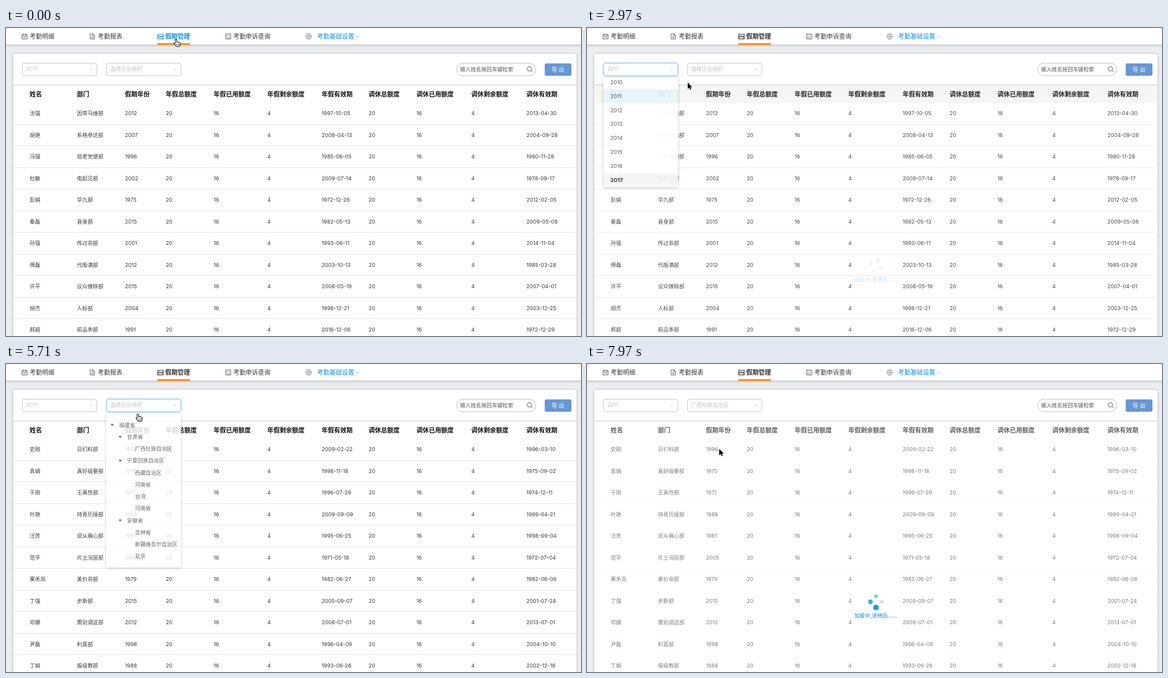
Animation of 1022x548 px, one loop 8000 ms. Source, as an HTML page with a canvas:

```html
<!DOCTYPE html>
<html lang="zh-CN">
<head>
<meta charset="utf-8">
<title>假期管理</title>
<style>
html, body { margin: 0; width: 100%; height: 100%; overflow: hidden; background: #ebedf0; }
canvas { display: block; width: 1022px; height: 548px; }
</style>
</head>
<body>
<canvas id="stage"></canvas>
<script>
const W = 1022, H = 548, LOOP = 8000;
const BLUE = '#0b8ff0', INK = '#3a3a3a', PALE = '#bfbfbf', HOVER = '#e7f5fe';
const FAMILY = 'Inter, "Noto Sans CJK SC", "Noto Sans CJK", sans-serif';
const dpr = window.devicePixelRatio || 1;

const makeContext = canvas => {
  canvas.width = W * dpr;
  canvas.height = H * dpr;
  const context = canvas.getContext('2d');
  context.scale(dpr, dpr);
  return context;
};
const stage = makeContext(document.getElementById('stage'));
const layer = makeContext(document.createElement('canvas'));
let ctx = stage;

// Bursts of screen updates: first, last, count. The picture rests in between.
const bursts = [
  [0, 0, 1], [150, 770, 5], [1060, 1860, 6], [2970, 2970, 1], [3270, 4250, 7],
  [4400, 5170, 6], [5350, 5350, 1], [5530, 6370, 6], [7120, 7970, 6]
];

const columns = [42, 126, 211.5, 284, 369, 464.5, 561, 644.5, 729.5, 827, 925];
const titles = '姓名 部门 假期年份 年假总额度 年假已用额度 年假剩余额度 年假有效期 调休总额度 调休已用额度 调休剩余额度 调休有效期'.split(' ');
const parseRows = text => text.trim().split('\n').map(line => {
  const [name, dept, year, leaveEnd, swapEnd] = line.trim().split(' ');
  return [name, dept, year, '20', '16', '4', leaveEnd, '20', '16', '4', swapEnd];
});
const rowsBefore = parseRows(`
  沈强 因带马维部 2012 1997-10-05 2013-04-30
  胡艳 系格参达部 2007 2008-04-13 2004-09-28
  冯强 验老党便部 1996 1985-06-05 1980-11-28
  杜敏 电起见部 2002 2009-07-14 1978-09-17
  彭娟 华九部 1975 1972-12-26 2012-02-05
  秦磊 县身部 2015 1982-05-13 2009-05-08
  孙强 传过非部 2001 1993-06-11 2014-11-04
  傅磊 代般满部 2012 2003-10-13 1985-03-28
  许平 议众做除部 2015 2008-05-19 2007-04-01
  胡杰 人标部 2004 1998-12-21 2003-12-25
  郝超 前品条部 1991 2016-12-06 1972-12-29`);
const rowsAfter = parseRows(`
  史刚 日们料部 1996 2009-02-22 1996-03-10
  袁娟 真好级要部 1970 1998-11-18 1975-09-02
  于刚 王真性部 1971 1996-07-29 1974-12-11
  叶艳 持青历接部 1988 2009-09-09 1989-04-21
  汪芳 说从展心部 1981 1995-06-25 1998-09-04
  范平 片土况层部 2005 1971-05-18 1972-07-04
  栗禾岚 美价非部 1979 1982-06-27 1982-06-06
  丁强 步斯部 2015 2005-09-07 2001-07-24
  邓娜 需别调这部 2012 2008-07-01 2013-07-01
  尹磊 利直部 1998 1996-04-09 2004-10-10
  丁娟 报级教部 1988 1993-06-26 2002-12-18`);

// Leading digit is the depth, "+" marks an open branch.
const tree = ['0+福建省', '1+甘肃省', '2 广西壮族自治区', '1+宁夏回族自治区', '2 西藏自治区', '2 河南省',
  '2 台湾', '2 河南省', '1+安徽省', '2 吉林省', '2 新疆维吾尔自治区', '2 北京'];

// Pointer tip: time, x, y
const pointerPath = [
  [0, 302, 20], [770, 143, 81], [1000, 143, 81], [1800, 123, 120], [2960, 123, 120],
  [2970, 179, 97], [3900, 234, 75.5], [5480, 234, 75.5], [6300, 236, 152], [7120, 236, 152], [7300, 235, 151]
];
const handShape = new Path2D('M-1.4 1.2Q0-.8 1.3 1.2L1.4 5Q2.8 4 3.6 5.2Q5 4.5 5.8 5.8Q7.6 5.3 7.9 7.2L7.6 9.8L6.4 13H.8Q-.8 10.2-3 8.2Q-3.1 6.2-1.2 7.4Z');
const arrowShape = new Path2D('M0 0V11.5L2.7 9L4.4 13L6.3 12.2L4.6 8.4H8.2Z');

const ramp = (t, a, b) => Math.min(1, Math.max(0, (t - a) / (b - a)));
const smooth = p => p * p * (3 - 2 * p);
const mix = (a, b, p) => a + (b - a) * p;

function snap(t) {
  const [first, last, count] = bursts.filter(b => b[0] <= t).pop();
  if (count < 2) return first;
  const gap = (last - first) / (count - 1);
  return first + gap * Math.min(count - 1, Math.floor((t - first) / gap + 1e-6));
}

function pointerAt(t) {
  const next = pointerPath.findIndex(k => k[0] > t);
  if (next < 0) return pointerPath[pointerPath.length - 1].slice(1);
  const a = pointerPath[next - 1], b = pointerPath[next];
  const p = smooth(ramp(t, a[0], b[0]));
  return [mix(a[1], b[1], p), mix(a[2], b[2], p)];
}

function text(s, x, y, size = 9.45, color = INK, weight = 400, align = 'left') {
  ctx.font = `${weight} ${size}px ${FAMILY}`;
  ctx.fillStyle = color;
  ctx.textAlign = align;
  ctx.fillText(s, x, y + size * 0.37);
}

function rect(x, y, w, h, color) {
  ctx.fillStyle = color;
  ctx.fillRect(x, y, w, h);
}

function box(x, y, w, h, r, fill, border) {
  ctx.beginPath();
  ctx.roundRect(x, y, w, h, r);
  if (fill) { ctx.fillStyle = fill; ctx.fill(); }
  if (border) { ctx.strokeStyle = border; ctx.stroke(); }
}

function shadowed(color, blur, dy, draw) {
  ctx.save();
  ctx.shadowColor = color;
  ctx.shadowBlur = blur * dpr;
  ctx.shadowOffsetY = dy * dpr;
  draw();
  ctx.restore();
}

// Draws a group off screen, then lays it on the stage with one opacity and blur.
function grouped(alpha, blur, draw) {
  ctx = layer;
  ctx.clearRect(0, 0, W, H);
  ctx.save();
  draw();
  ctx.restore();
  ctx = stage;
  ctx.save();
  ctx.globalAlpha = alpha;
  if (blur > 0) ctx.filter = `blur(${blur * dpr}px)`;
  ctx.drawImage(layer.canvas, 0, 0, W, H);
  ctx.restore();
}

function stroke(path, color, width = 1) {
  ctx.strokeStyle = color;
  ctx.lineWidth = width;
  ctx.stroke(new Path2D(path));
  ctx.lineWidth = 1;
}

function dot(x, y, r, color) {
  ctx.beginPath();
  ctx.arc(x, y, r, 0, 7);
  ctx.fillStyle = color;
  ctx.fill();
}

const chevron = (x, y, up, color) => {
  const d = up ? -1.3 : 1.3;
  stroke(`M${x - 2.4} ${y - d}L${x} ${y + d}L${x + 2.4} ${y - d}`, color, 0.9);
};

function drawNav(t) {
  shadowed('rgba(0,0,0,.22)', 4, 1, () => rect(-5, -5, W + 10, 34.5, '#fff'));
  const p = ramp(t, 150, 460);
  const active = `rgb(${mix(11, 50, p)},${mix(143, 50, p)},${mix(240, 50, p)})`;
  const line = '#555';
  stroke('M28.5 11.5H37.5V19.5H28.5ZM28.5 14H37.5M30.8 10V12.5M35.2 10V12.5M30.5 16.5H35.5', line, 0.9);
  stroke('M149.5 10.3H154.7L157.5 13V19.7H149.5ZM154.5 10.3V13.2H157.5M151.3 15H155.7M151.3 17.3H155.7', line, 0.9);
  stroke('M269.7 11H279.3V19.3H269.7ZM270 16.8L272.8 14L275 16L277 14.4L279 16.8M272.3 12.9H273', active, 1.2);
  stroke('M390.5 10.5H399.5V19.5H390.5ZM392.3 13H394M395.3 13H398M392.3 15.3H394M396.5 15V19M392.3 17.5H394', line, 0.9);
  stroke('M535.7 10.6H540.3L542.8 15L540.3 19.4H535.7L533.2 15ZM536.3 15A1.7 1.7 0 1 0 539.7 15A1.7 1.7 0 1 0 536.3 15', line, 0.9);
  text('考勤明细', 42, 15, 11, INK);
  text('考勤报表', 163, 15, 11, INK);
  text('假期管理', 283, 15, 11, active, 700);
  text('考勤申诉查询', 404, 15, 11, INK);
  text('考勤基础设置', 553, 15, 11, BLUE, 500);
  chevron(625, 15.3, false, '#7aa9cf');
  rect(269, 27, 58, 3, '#ff8c0a');
}

function drawSelect(x, value, focused, open) {
  const outline = () => box(x + 0.5, 62.5, 132.5, 22.5, 4, '#fff', focused ? '#8ccaf2' : '#c4c4c4');
  if (focused) shadowed('rgba(16,142,233,.35)', 3.5, 0, outline);
  else outline();
  text(value, x + 7.3, 73, 9.45, PALE);
  chevron(x + 122, 73.7, open, '#c2c2c2');
}

function drawToolbar(t) {
  drawSelect(28.5, t < 2970 ? '2017' : '2011', t >= 1060 && t < 5530, t >= 1060 && t < 2970);
  drawSelect(178, t < 7120 ? '选择企业组织' : '广西壮族自治区', t >= 5530 && t < 7290, t >= 5530 && t < 7120);
  box(801, 62.5, 140.5, 22.5, 11.2, '#fff', '#c0c0c0');
  text('输入姓名按回车键检索', 807, 74, 9.45, '#555');
  stroke('M926.3 72.7A4 4 0 1 0 934.3 72.7A4 4 0 1 0 926.3 72.7M933.2 75.6L936 78.2', '#555', 1);
  box(957.5, 63, 47.5, 22, 3, '#6896d2');
  text('导 出', 981, 74, 10, '#fff', 500, 'center');
}

function drawTable(t, busy) {
  const headHover = (t >= 2970 && t < 3270) || (t >= 5000 && t < 5350);
  if (headHover) rect(13.5, 102, 1000.5, 31, '#f5f5f5');
  titles.forEach((title, i) => text(title, columns[i], 118, 11, '#111', 700));
  (t < 5000 ? rowsBefore : rowsAfter).forEach((row, r) => {
    const y = 152 + r * 38.5;
    row.forEach((cell, i) => text(cell, columns[i], y));
    rect(13, Math.floor(y + 19), 1001, 1, `rgba(0,0,0,${0.1 * (1 - 0.8 * busy)})`);
  });
}

function drawSpinner(elapsed, busy) {
  ctx.save();
  ctx.globalAlpha = busy;
  text('加载中,请稍后......', 513.5, 447.5, 9.45, BLUE, 500, 'center');
  for (let i = 0; i < 4; i++) {
    const u = Math.max(0, elapsed - i * 0.4) % 2;
    const glow = 0.3 + 0.7 * Math.pow(u < 1 ? u : 2 - u, 0.6);
    const angle = (elapsed * 198.4 + i * 90 - 90) * Math.PI / 180;
    ctx.globalAlpha = busy * glow;
    dot(513.8 + 10 * Math.cos(angle), 423.2 + 10 * Math.sin(angle), 2.2 + 2.8 * glow, '#0797f4');
  }
  ctx.restore();
}

function dropdown(x, bottom, shown, drawItems) {
  if (shown <= 0) return;
  const top = 88, w = 133;
  grouped(shown, 0, () => {
    ctx.translate(0, top);
    ctx.scale(1, 0.8 + 0.2 * shown);
    ctx.translate(0, -top);
    shadowed('rgba(0,0,0,.26)', 5, 1, () => box(x, top, w, bottom - top, 3, '#fff'));
    ctx.beginPath();
    ctx.roundRect(x, top, w, bottom - top, 3);
    ctx.clip();
    drawItems();
  });
}

function drawYears(t, pointerY) {
  const closing = t >= 2970;
  const hovered = closing || pointerY > 109 ? 1 : pointerY > 88 ? 0 : 7;
  for (let i = 0; i < 8; i++) {
    const y = 96.5 + i * 25.1;
    if (i === hovered) rect(29, y - 12.5, 134, 25.1, HOVER);
    else if (closing && i === 7) rect(29, y - 12.5, 134, 25.1, '#f5f5f5');
    text(String(2010 + i), 41.5, y, 9.6, i === 7 ? '#333' : '#555', i === 7 ? 700 : 400);
  }
}

function drawTree(pointerY) {
  const hovered = Math.round((pointerY + 1 - 109) / 22);
  tree.forEach((entry, i) => {
    const x = 201 + 14.1 * entry[0], y = 109 + 22 * i, label = entry.slice(2);
    if (i === hovered) box(x - 4, y - 7.5, label.length * 9.45 + 7.5, 15, 1.5, HOVER);
    if (entry[1] === '+') {
      ctx.fillStyle = '#444';
      ctx.fill(new Path2D(`M${x - 15} ${y - 1.5}h5.6l-2.8 3.8z`));
    }
    text(label, x, y, 9.45, '#484848');
  });
}

function drawPointer(t, [x, y]) {
  const arrow = (t >= 300 && t < 600) || (t >= 2970 && t < 3500) || t >= 7250;
  ctx.save();
  ctx.translate(x, y);
  ctx.lineJoin = 'round';
  if (arrow) {
    ctx.strokeStyle = '#fff';
    ctx.lineWidth = 1.6;
    ctx.stroke(arrowShape);
    ctx.fillStyle = '#000';
    ctx.fill(arrowShape);
  } else {
    ctx.fillStyle = '#fff';
    ctx.fill(handShape);
    ctx.strokeStyle = '#111';
    ctx.lineWidth = 1.1;
    ctx.stroke(handShape);
    stroke('M1.5 8V11M3.6 8V11M5.6 8V11', '#222', 0.8);
  }
  ctx.restore();
}

function render(t) {
  const pointer = pointerAt(t);
  const second = t > 6000;
  const busy = second ? ramp(t, 7060, 7350) : ramp(t, 2900, 3200) * (1 - ramp(t, 4940, 5120));
  rect(0, 0, W, H, '#ebedf0');
  drawNav(t);
  shadowed('rgba(0,0,0,.25)', 4, 0.5, () => box(13, 46, 1001, 520, 2, '#fff'));
  grouped(1 - 0.34 * busy, busy > 0.3 ? 0.75 * busy : 0, () => drawTable(t, busy));
  rect(13, 101, 1001, 1, '#c9c9c9');
  drawToolbar(t);
  if (busy > 0) drawSpinner((t - (second ? 7060 : 2880)) / 1000, busy);
  dropdown(29, 285.5, ramp(t, 1000, 1300) * (1 - ramp(t, 2960, 3160)), () => drawYears(t, pointer[1]));
  dropdown(178, 372, ramp(t, 5450, 5750) * (1 - ramp(t, 7080, 7280)), () => drawTree(pointer[1]));
  drawPointer(t, pointer);
}

const start = performance.now();
function tick() {
  render(snap((performance.now() - start) % LOOP));
  requestAnimationFrame(tick);
}
tick();
</script>
</body>
</html>
```
